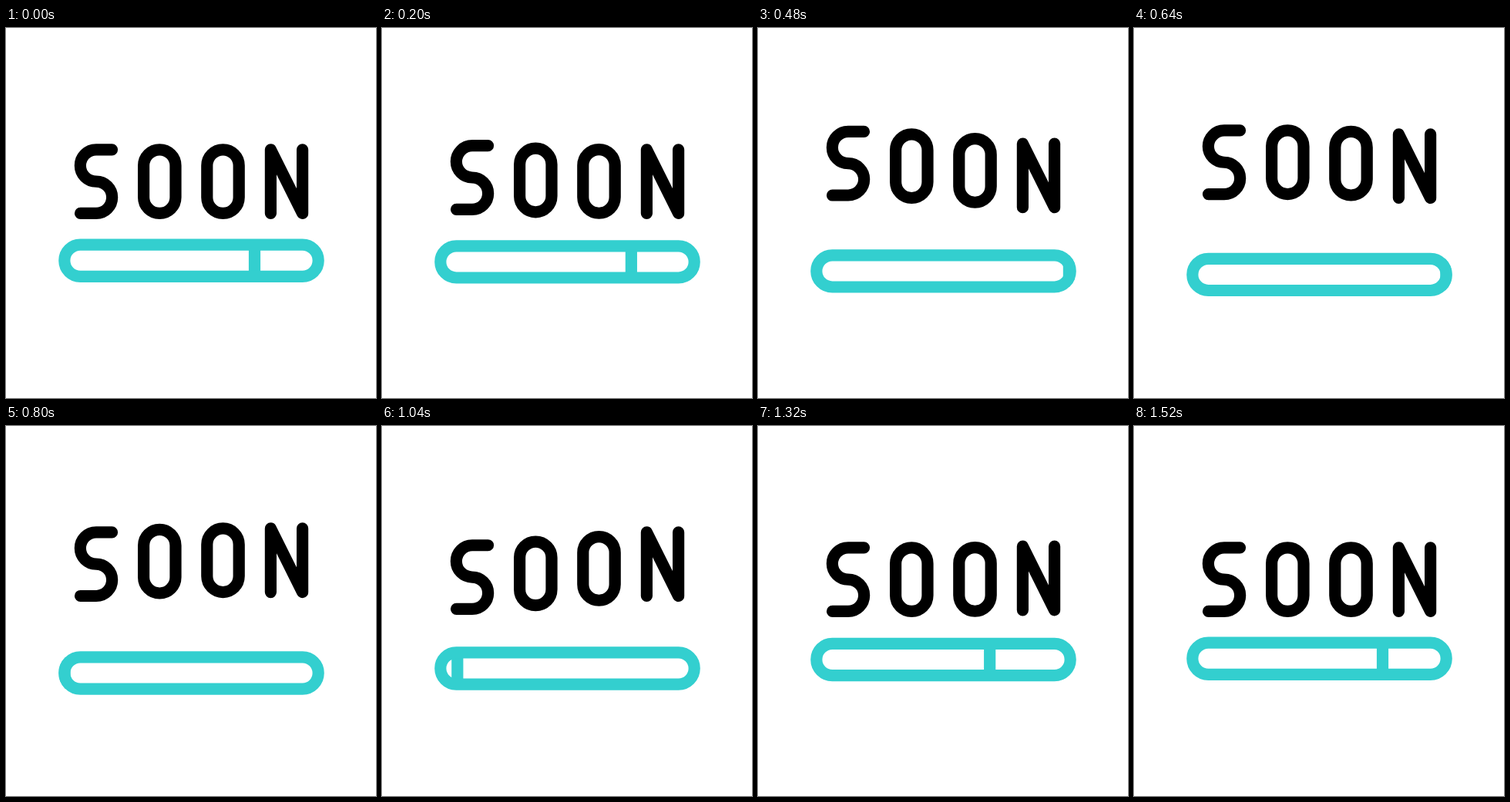
An HTML page that plays this animation: 480x480 px, repeating every 1.56 s.

```html
<!DOCTYPE html>
<html lang="en">
<head>
<meta charset="utf-8">
<title>Soon</title>
<style>
  html, body { margin: 0; width: 100%; height: 100%; overflow: hidden; background: #fff; }
  svg { display: block; width: 100vw; height: 100vh; }
</style>
</head>
<body>
<svg viewBox="0 0 480 480" fill="none" stroke-width="15.2" stroke-linecap="round" stroke-linejoin="round" role="img" aria-label="SOON">
  <defs>
    <clipPath id="capsule"><rect x="68.2" y="273.6" width="344.6" height="56.4" rx="28.2"/></clipPath>
  </defs>
  <g stroke="#000">
    <path class="letter" d="M137.5 157.8H117a20.65 20.65 0 0 0 0 41.3a20.65 20.65 0 0 1 0 41.3H96.5"/>
    <rect class="letter" x="178.6" y="157.8" width="41.4" height="82.6" rx="20.7"/>
    <rect class="letter" x="260.8" y="157.8" width="41.4" height="82.6" rx="20.7"/>
    <path class="letter" d="M343.4 240.4V157.8L384.6 240.4V157.8"/>
  </g>
  <g id="bar" stroke="#33cfcf">
    <g clip-path="url(#capsule)">
      <path id="divider" d="M0 281.2V322.4" stroke-linecap="butt"/>
    </g>
    <rect x="75.8" y="281.2" width="329.4" height="41.2" rx="20.6"/>
  </g>
</svg>
<script>
const LOOP = 1560, STEP = 40;
const letters = document.querySelectorAll('.letter');
const bar = document.getElementById('bar');
const divider = document.getElementById('divider');

// Eased progress, cubic-bezier(.5, 0, .5, 1)
function ease(p) {
  if (p <= 0) return 0;
  if (p >= 1) return 1;
  let lo = 0, hi = 1;
  for (let i = 0; i < 24; i++) {
    const m = (lo + hi) / 2;
    if (1.5 * m * (1 - m) + m * m * m < p) lo = m; else hi = m;
  }
  return lo * lo * (3 - 2 * lo);
}

const tween = (t, start, end, from, to) =>
  from + (to - from) * ease((t - start) / (end - start));

// Out and back around a peak time
const swing = (t, peak, half, size) =>
  size * ease(1 - Math.abs(t - peak) / half);

const shift = (el, x, y) =>
  el.setAttribute('transform', `translate(${x.toFixed(2)} ${y.toFixed(2)})`);

function draw(t) {
  letters.forEach((el, i) => shift(el, 0, -swing(t, 600 + 80 * i, 600, 25)));
  shift(bar, 0, swing(t, 750, 710, 18.8));
  const x = t < 720 ? tween(t, 170, 520, 322.5, 405) : tween(t, 920, 1440, 76, 322.5);
  shift(divider, x, 0);
}

const t0 = performance.now();
function tick() {
  const t = (performance.now() - t0) % LOOP;
  draw(Math.floor(t / STEP) * STEP);
  requestAnimationFrame(tick);
}
draw(0);
requestAnimationFrame(tick);
</script>
</body>
</html>
```
